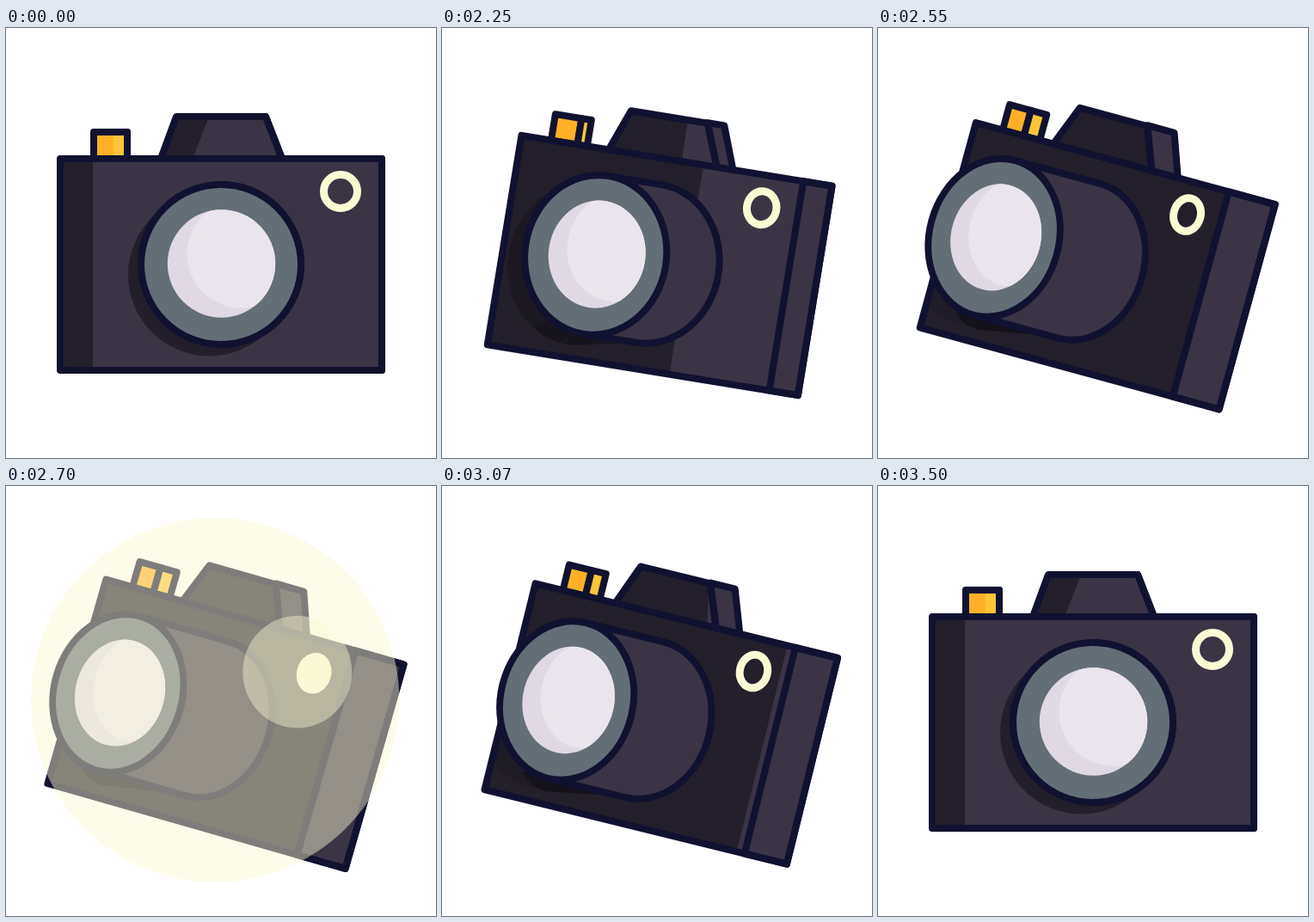
Recreate the animation shown at these times as an HTML page. Size 500 by 500 pixels, loop 3520 ms.

```html
<!DOCTYPE html>
<html lang="en">
<head>
<meta charset="utf-8">
<title>Camera flash</title>
<style>
  /* --p: 0 = facing front, 1 = fully turned */
  @property --p { syntax: "<number>"; inherits: true; initial-value: 0; }

  html, body { margin: 0; width: 100%; height: 100%; overflow: hidden; background: #fff; }
  svg {
    display: block; width: 100vw; height: 100vh;
    --navy: #11122f; --body: #3a3445; --shade: #231f2b; --cream: #fbfad5;
    animation: turn 3520ms linear infinite;
  }

  @keyframes turn {
    0%, 99.432%, 100% { --p: 0; }
    56.818% { --p: 0; animation-timing-function: ease; }
    78.125% { --p: 1; animation-timing-function: cubic-bezier(.75, 0, .75, .9); }
  }
  @keyframes morph {
    0%, 99.432%, 100% { d: var(--a); }
    56.818% { d: var(--a); animation-timing-function: ease; }
    78.125% { d: var(--b); animation-timing-function: cubic-bezier(.75, 0, .75, .9); }
  }
  @keyframes burst {
    0%, 73%, 83.3%, 100% { transform: scale(.06); opacity: 0; }
    73.01% { transform: scale(.06); opacity: .2; animation-timing-function: ease-out; }
    77.9%, 78.8% { transform: scale(1); opacity: 1; animation-timing-function: ease-in; }
    83.29% { transform: scale(.06); opacity: .2; }
  }
  @keyframes glow {
    0%, 73%, 83.3%, 100% { fill-opacity: 0; }
    75%, 81.3% { fill-opacity: 1; }
  }

  .camera {
    transform: translate(calc(250px + 5.5px * var(--p)), calc(275px + 1.75px * var(--p)))
               rotate(calc(16deg * var(--p)));
  }
  .m { d: var(--a); animation: morph 3520ms linear infinite; }
  .line { stroke: var(--navy); stroke-width: 8px; stroke-linejoin: round; stroke-linecap: round; }
  .none { fill: none; }
  .body { fill: var(--body); }
  .shade { fill: var(--shade); }
  .amber { fill: #ffb026; }
  .gold { fill: #ffc538; }

  .box {
    x: calc(-187px + 7px * var(--p)); y: calc(-123px - .5px * var(--p));
    width: calc(374px - 14px * var(--p)); height: calc(246px + 1px * var(--p));
  }
  .strip {
    x: calc(-187px + 7px * var(--p)); y: -123px;
    width: calc(38px + 305px * var(--p)); height: 246px;
  }
  .cast {
    cx: calc(-13.5px - 134.5px * var(--p)); cy: calc(12px + 2px * var(--p));
    rx: calc(94.5px - 17px * var(--p)); ry: 94.5px;
    fill: #000; opacity: calc(.4 - .34 * var(--p));
  }
  .under { fill: #14111a; opacity: var(--p); }
  .ring {
    cx: calc(139px - 56.7px * var(--p)); cy: -85px;
    rx: calc(19.5px - 4px * var(--p)); ry: 19.5px;
    fill: var(--cream); stroke: var(--cream); stroke-width: 9px;
    fill-opacity: 0; animation: glow 3520ms linear infinite;
  }
  .disc {
    cx: calc(-130.5px * var(--p)); cy: 0;
    rx: calc(93px - 18.5px * var(--p)); ry: 93px; fill: #646e77;
  }
  .glass {
    cx: calc(.5px - 129px * var(--p)); cy: -1px;
    rx: calc(62.7px - 11px * var(--p)); ry: 62.7px; fill: #e0d9e4;
  }
  .shine {
    cx: calc(23.5px - 133px * var(--p)); cy: calc(-12.5px + .5px * var(--p));
    rx: calc(63px - 11px * var(--p)); ry: 63px; fill: #eae5ec;
  }
  .flash {
    fill: var(--cream); fill-opacity: .5; opacity: 0;
    transform-origin: 358px 218px;
    animation: burst 3520ms linear infinite;
  }
</style>
</head>
<body>
<svg viewBox="0 0 500 500">
  <defs>
    <clipPath id="inBox"><rect class="box"/></clipPath>
    <clipPath id="inGlass"><ellipse class="glass"/></clipPath>
  </defs>

  <g class="camera">
    <!-- shutter button -->
    <path class="m amber line" style="--a:path('M-148 -123V-154H-109V-123Z');--b:path('M-148 -123V-154H-123V-123Z')"/>
    <path class="m gold" style="--a:path('M-125.5 -123V-150H-113V-123Z');--b:path('M-115 -123V-150H-115V-123Z')"/>
    <path class="m gold line" style="--a:path('M-109 -123V-154H-109V-123Z');--b:path('M-123 -123V-154H-103V-123Z')"/>

    <!-- viewfinder -->
    <path class="m body" style="--a:path('M-70 -123L-52 -172H52L71 -123Z');--b:path('M-88 -123L-69 -172H11L30 -123Z')"/>
    <path class="m shade" style="--a:path('M-70 -123L-52 -172H-14L-33 -123Z');--b:path('M-88 -123L-69 -172H19L34 -123Z')"/>
    <path class="m body line" style="--a:path('M71 -123L52 -172H52L71 -123Z');--b:path('M30 -123L11 -173H45L63 -123Z')"/>
    <path class="m none line" style="--a:path('M-70 -123L-52 -172H52L71 -123Z');--b:path('M-88 -123L-69 -172H11L30 -123Z')"/>

    <!-- body -->
    <rect class="box body"/>
    <rect class="strip shade"/>
    <g clip-path="url(#inBox)">
      <ellipse class="cast"/>
      <path class="m under" style="--a:path('M-120 92Q-90 108 -43 108L28 94L-43 70Z');--b:path('M-146 94Q-138 108 -119 108L-35 93L-119 70Z')"/>
    </g>
    <path class="m body line" style="--a:path('M187 -123H187V123H187Z');--b:path('M121.5 -123.5H180V123.5H121.5Z')"/>
    <rect class="box none line"/>
    <ellipse class="ring"/>

    <!-- lens -->
    <path class="m body line" style="--a:path('M0 -93L0 -93A93 93 0 0 1 0 93L0 93Z');--b:path('M-130.5 -93L-23 -93A74.5 93 0 0 1 -23 93L-130.5 93Z')"/>
    <ellipse class="disc line"/>
    <ellipse class="glass"/>
    <g clip-path="url(#inGlass)"><ellipse class="shine"/></g>
  </g>

  <g class="flash">
    <ellipse cx="233" cy="251.5" rx="233" ry="230.5"/>
    <ellipse cx="337" cy="216" rx="69" ry="71"/>
  </g>
</svg>
</body>
</html>
```
